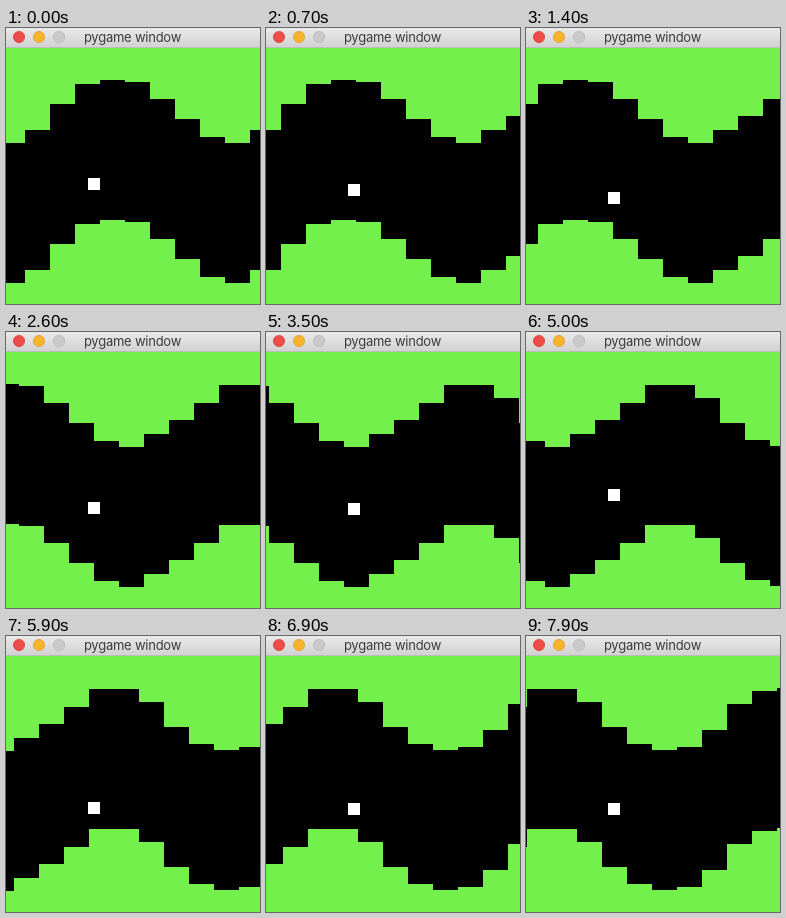
Recreate the animation shown at these times as an HTML page with a canvas. Size 254 by 276 pixels, loop 8000 ms.

```html
<!DOCTYPE html>
<html lang="en">
<head>
<meta charset="utf-8">
<title>pygame window</title>
<style>
  html, body { margin: 0; width: 100%; height: 100%; overflow: hidden; background: #000; }
  canvas { position: absolute; left: 0; top: 0; display: block; }
  header {
    position: absolute; left: 0; top: 0; width: 254px; height: 20px; box-sizing: border-box;
    background: linear-gradient(#e9e9e9, #d2d2d2); border-bottom: 1px solid #bcbcbc;
  }
  header svg { display: block; }
  text { font: 13px Inter, Roboto, sans-serif; letter-spacing: -0.24px; fill: #3c3c3c; }
</style>
</head>
<body>
<canvas width="254" height="276"></canvas>
<header>
  <svg width="254" height="19">
    <circle cx="13" cy="9" r="5.6" fill="#ee4d47" stroke="#d6403b" stroke-width=".8"/>
    <circle cx="33" cy="9" r="5.6" fill="#f6b42e" stroke="#dda02b" stroke-width=".8"/>
    <circle cx="53" cy="9" r="5.6" fill="#c9c9c9" stroke="#b6b6b6" stroke-width=".8"/>
    <text x="126.5" y="14" text-anchor="middle">pygame window</text>
  </svg>
</header>
<script>
const LOOP = 8000, STEP = 100;
const WIDTH = 254, TOP = 20, BOTTOM = 276;
const COLUMN = 25, GAP = 140, FIRST_X = -6;
const CEILING = [115, 102, 76, 56, 52, 54, 71, 91, 109, 115, 102, 88, 71,
                 53, 53, 66, 91, 108, 114, 111, 94, 68, 55, 52];

// Poses at tick numbers of 100 ms
const TICKS = [0, 14, 26, 35, 50, 59, 79];
const SCROLL = [0, 57, 106, 141, 200, 236, 318];
const HEIGHT = [150, 164, 170, 171, 157, 166, 167];

const ctx = document.querySelector('canvas').getContext('2d');

function segment(tick) {
  let i = 0;
  while (i < TICKS.length - 2 && tick > TICKS[i + 1]) i++;
  const span = TICKS[i + 1] - TICKS[i];
  return { i, span, u: (tick - TICKS[i]) / span };
}

function linear(values, tick) {
  const { i, u } = segment(tick);
  return values[i] + (values[i + 1] - values[i]) * u;
}

function slope(values, i) {
  if (i === 0 || i === values.length - 1) return 0;
  return (values[i + 1] - values[i - 1]) / (TICKS[i + 1] - TICKS[i - 1]);
}

// Cubic Hermite, so that the player keeps its momentum
function smooth(values, tick) {
  const { i, span, u } = segment(tick);
  const ease = u * u * (3 - 2 * u);
  return values[i] + (values[i + 1] - values[i]) * ease
    + slope(values, i) * span * u * (1 - u) ** 2
    - slope(values, i + 1) * span * u * u * (1 - u);
}

function draw(tick) {
  const scroll = Math.round(linear(SCROLL, tick));
  ctx.fillStyle = '#000';
  ctx.fillRect(0, 0, WIDTH, BOTTOM);
  ctx.fillStyle = '#73f04b';
  CEILING.forEach((y, i) => {
    const x = FIRST_X + i * COLUMN - scroll;
    ctx.fillRect(x, TOP, COLUMN, y - TOP);
    ctx.fillRect(x, y + GAP, COLUMN, BOTTOM - y - GAP);
  });
  ctx.fillStyle = '#fff';
  ctx.fillRect(82, Math.round(smooth(HEIGHT, tick)), 12, 12);
}

const start = performance.now();
function frame() {
  const time = (performance.now() - start) % LOOP;
  draw(Math.floor(time / STEP));
  requestAnimationFrame(frame);
}
frame();
</script>
</body>
</html>
```
